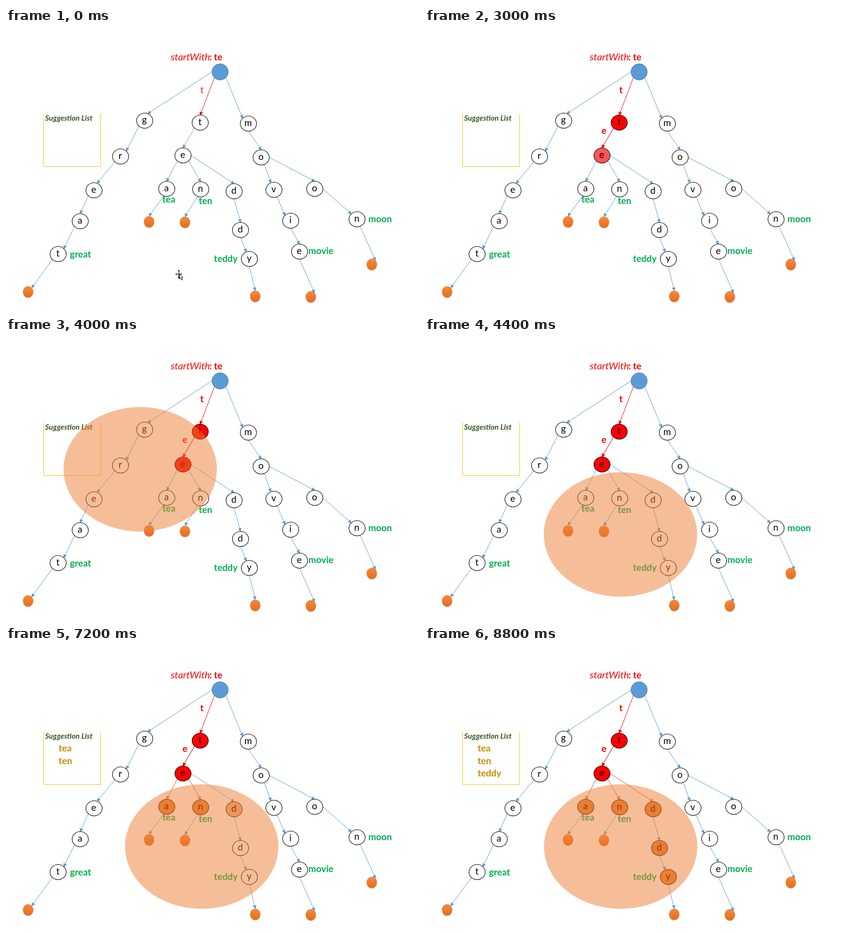
An HTML page that plays this animation: 840 px wide and 573 px high, repeating every 9400 ms.

```html
<!DOCTYPE html>
<html lang="en">
<head>
<meta charset="utf-8">
<title>Prefix search in a trie</title>
<style>
  html, body { margin: 0; width: 100%; height: 100%; overflow: hidden; background: #fff; }
  svg { display: block; width: 840px; height: 573px; }
  text { font: 18.8px Lato, Inter, sans-serif; }
  .bold { font-weight: 700; }
  .mid { text-anchor: middle; }
</style>
</head>
<body>
<svg id="stage" viewBox="0 0 840 573">
  <defs>
    <linearGradient id="leaf" x2="0" y2="1">
      <stop stop-color="#f58a45"/><stop offset="1" stop-color="#e66c16"/>
    </linearGradient>
    <linearGradient id="wipe" gradientUnits="userSpaceOnUse" x1="0" x2="0">
      <stop stop-color="#ed7d31" stop-opacity="0"/>
      <stop offset="1" stop-color="#ed7d31" stop-opacity=".5"/>
    </linearGradient>
  </defs>
</svg>
<script>
const BLUE = '#5b9bd5', RED = '#f00', ORANGE = '#ed7d31', GREEN = '#00b050', GOLD = '#bf9000';
const LOOP = 9400, STEP = 200, LAST = 8800, FADE = 450;
const QUERY = 'te';
const COMPASS = 'n nne ne ene e ese se sse s ssw sw wsw w wnw nw nnw'.split(' ');
const stage = document.getElementById('stage');
const wipe = document.getElementById('wipe');

// prefix, x, y, side where the arrow leaves the parent, side where it arrives
const nodes = [
  ['g', 282, 189, 'w', 'nne'], ['gr', 233, 262, 'sw', 'ne'], ['gre', 179, 331, 'sw', 'nne'],
  ['grea', 151, 394, 'sw', 'n'], ['great', 106, 461, 'sw', 'ne'],
  ['t', 395, 193, 'sw', 'n'], ['te', 360, 260, 'sw', 'n'],
  ['tea', 327, 328, 'sw', 'n'], ['ten', 396, 329, 'se', 'n'],
  ['ted', 464, 333, 'e', 'n'], ['tedd', 477, 412, 's', 'n'], ['teddy', 495, 471, 's', 'nnw'],
  ['m', 493, 195, 'se', 'nw'], ['mo', 519, 264, 's', 'n'], ['mov', 545, 330, 'sse', 'nnw'],
  ['movi', 579, 393, 'sse', 'nw'], ['movie', 597, 456, 's', 'n'],
  ['moo', 628, 328, 'e', 'n'], ['moon', 714, 390, 'e', 'nw']
].map(n => toNode(n, 16.5, 15.5));

// end marks of whole words, with the place of the word's label
const ends = [
  ['great.', 45, 538, 'sw', 'ne', 130, 468], ['tea.', 291, 395, 'ssw', 'n', 318, 356],
  ['ten.', 364, 396, 'ssw', 'n', 392, 359], ['teddy.', 507, 547, 's', 'n', 423, 477],
  ['movie.', 620, 548, 's', 'ne', 615, 461], ['moon.', 744, 482, 'sse', 'ne', 737, 396]
].map(n => toNode(n, 10.5, 11.5));

const root = { key: '', x: 435.5, y: 89.5, rx: 16.5, ry: 16.5 };
const byKey = Object.fromEntries([root, ...nodes, ...ends].map(n => [n.key, n]));

// evenly spaced start times of the fades
const cues = {};
function cue(start, gap, names) {
  names.forEach((name, i) => { cues[name] = start + gap * i; });
}
cue(-300, 0, ['label t']);
cue(900, 600, ['node t', 'edge te', 'label e', 'node te']);
cue(4820, 350, ['edge tea', 'node tea', 'word tea', 'edge ten', 'node ten', 'word ten',
  'node ted', 'edge ted', 'node tedd', 'node teddy', 'word teddy']);

const fades = [];

function toNode([key, x, y, from, to, wordX, wordY], rx, ry) {
  return { key, x, y, from, to, wordX, wordY, rx, ry };
}

function add(tag, attrs, content) {
  const el = document.createElementNS('http://www.w3.org/2000/svg', tag);
  for (const key in attrs) el.setAttribute(key, attrs[key]);
  if (content) el.textContent = content;
  return stage.appendChild(el);
}

function text(str, x, y, fill, cls = 'bold', style = '') {
  return add('text', { x, y, fill, class: cls, style }, str);
}

function oval({ x, y, rx, ry }, attrs) {
  return add('ellipse', { cx: x, cy: y, rx, ry, ...attrs });
}

// runs draw() only for names that have a cue
function reveal(name, draw) {
  if (name in cues) fades.push({ el: draw(), start: cues[name] });
}

function anchor(node, side) {
  const a = COMPASS.indexOf(side) * Math.PI / 8;
  return [node.x + node.rx * Math.sin(a), node.y - node.ry * Math.cos(a)];
}

function arrow(node, color) {
  const [x1, y1] = anchor(byKey[node.key.slice(0, -1)], node.from);
  const [x2, y2] = anchor(node, node.to);
  const len = Math.hypot(x2 - x1, y2 - y1);
  const ux = (x2 - x1) / len, uy = (y2 - y1) / len;
  const bx = x2 - ux * 6, by = y2 - uy * 6;
  return add('path', {
    d: `M${x1} ${y1}L${bx} ${by}L${bx - uy * 3} ${by + ux * 3}L${x2} ${y2}L${bx + uy * 3} ${by - ux * 3}L${bx} ${by}`,
    fill: color, stroke: color
  });
}

const glow = key => QUERY.startsWith(key) ? RED : ORANGE;

add('path', { d: 'M76.5 175V282.5H192.5V175', fill: 'none', stroke: '#ffc000' });
text('Suggestion List', 79.5, 189, '#375623', 'bold', 'font-size:15.3px;font-style:italic');
text('startWith', 335, 66, RED, '', 'font-size:20px;font-style:italic');
text(': ' + QUERY, 440, 66, RED, 'bold', 'text-anchor:end');

for (const node of [...nodes, ...ends]) {
  arrow(node, node.key === 't' ? RED : BLUE);
  reveal('edge ' + node.key, () => arrow(node, glow(node.key)));
}
oval(root, { fill: BLUE, stroke: '#41719c' });

for (const node of nodes) {
  oval(node, { fill: '#fff' });
  reveal('node ' + node.key, () => oval(node, { fill: glow(node.key) }));
  oval(node, { fill: 'none', stroke: '#000', 'stroke-width': 1.1 });
  text(node.key.at(-1), node.x - 0.5, node.y + 4.5, '#000', 'mid');
}

ends.forEach((node, i) => {
  const word = node.key.slice(0, -1);
  oval({ ...node, y: node.y + 1.5 }, { fill: '#000', opacity: .18 });
  oval(node, { fill: 'url(#leaf)' });
  text(word, node.wordX, node.wordY, GREEN);
  reveal('word ' + word, () => text(word, 107, 215 + 25.5 * (i - 1), GOLD));
});

reveal('label t', () => text('t', 398.5, 133, RED, 'bold mid'));
reveal('label e', () => text('e', 364, 216, RED, 'bold mid'));

const blob = oval({ x: 205, y: 208, rx: 156, ry: 127 }, { fill: 'url(#wipe)' });

const pointer = add('path', {
  d: 'M345 502H358M351.5 494V510M349.5 496L351.5 493.5L353.5 496M349.5 508L351.5 510.5L353.5 508' +
     'M347.5 500L345 502L347.5 504M355.5 500L358 502' +
     'M352.5 501V512L355 509.5L357 514L359 513L357 509H360Z',
  fill: '#fff', stroke: '#000'
});

const ramp = (t, start, end) => Math.min(1, Math.max(0, (t - start) / (end - start)));

function smooth(t, start, end) {
  const p = ramp(t, start, end);
  return p * p * (3 - 2 * p);
}

function render(t) {
  for (const { el, start } of fades) el.setAttribute('opacity', ramp(t, start, start + FADE));

  // soft-edged wipe from the bottom, then an eased slide
  const edge = 335 - 285 * ramp(t, 3424, 3957);
  wipe.setAttribute('y1', edge - 2);
  wipe.setAttribute('y2', edge + 27);
  blob.setAttribute('transform',
    `translate(${193 * smooth(t, 3720, 4420)} ${201 * smooth(t, 3720, 4480)})`);

  pointer.setAttribute('visibility', t < STEP ? 'visible' : 'hidden');
}

function tick() {
  const now = performance.now() % LOOP;
  render(Math.min(LAST, Math.floor(now / STEP) * STEP));
  requestAnimationFrame(tick);
}
tick();
</script>
</body>
</html>
```
